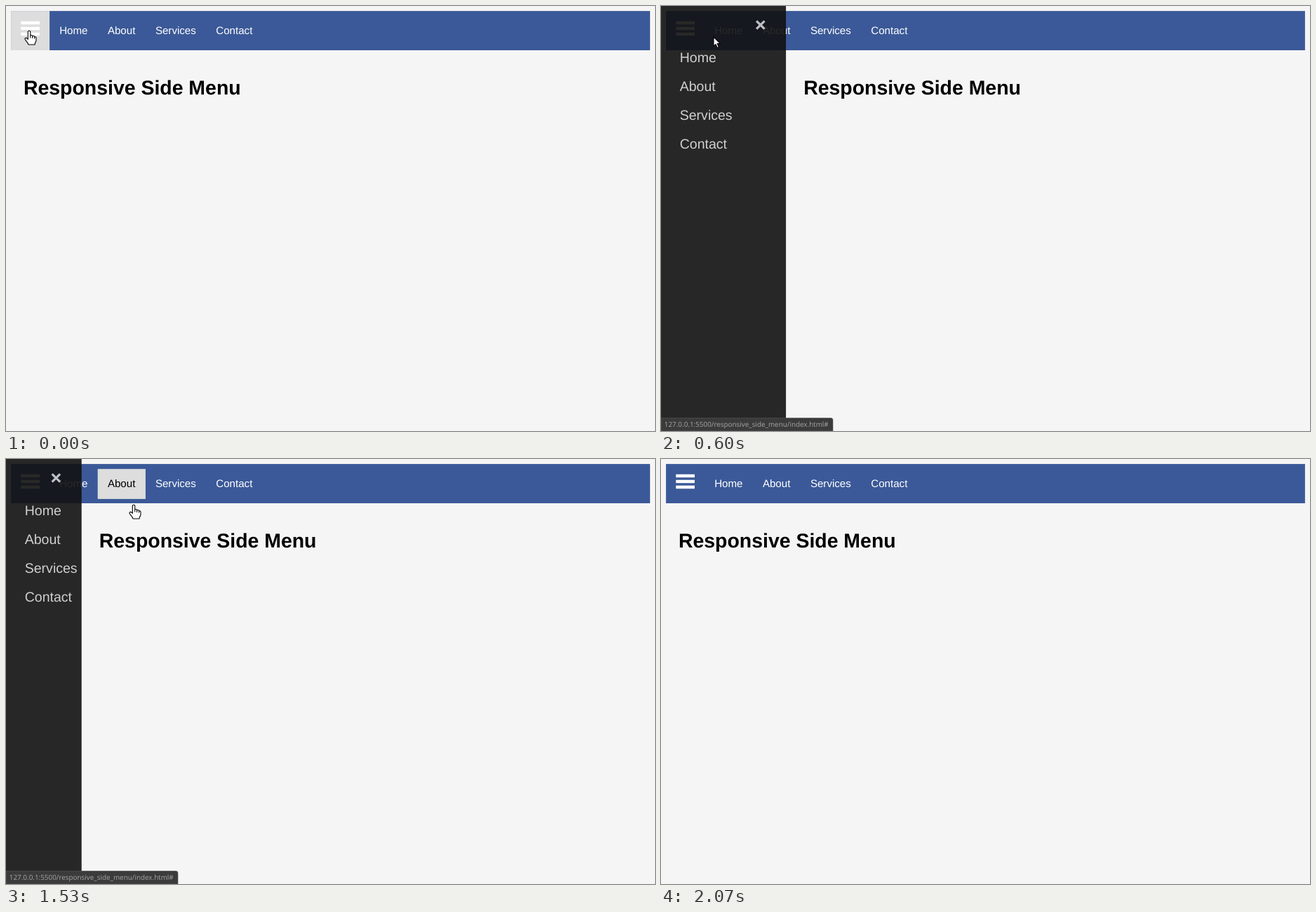
Animation, 925 px wide and 605 px high, one loop 2.67 s. Source, as an HTML page:

```html
<!DOCTYPE html>
<html lang="en">
<head>
<meta charset="utf-8">
<title>Responsive Side Menu</title>
<style>
html, body { margin: 0; width: 100%; height: 100%; overflow: hidden; background: #f5f5f5; }
svg { display: block; }
text { font-family: "Liberation Sans", Arial, sans-serif; text-rendering: geometricPrecision; }
#nav { font-size: 15.11px; fill: #fff; }
#title { font-size: 28.44px; font-weight: bold; }
#links { font-size: 19.56px; fill: #ccc; }
#status text { font: 9.9px "Open Sans", "Noto Sans", sans-serif; fill: #a6a6a6; }
#cursor path { fill: #fff; stroke: #000; stroke-width: 1.1; stroke-linejoin: round; }
</style>
</head>
<body>
<svg width="925" height="605">
  <rect x="7.1" y="7.1" width="910.8" height="55.9" fill="#3b5998"/>
  <rect id="menuHover" x="7.1" y="7.1" width="55" height="55.9" fill="#ddd"/>
  <rect id="aboutHover" x="130.7" y="14.2" width="68.2" height="42.7" fill="#ddd"/>
  <path d="M21.3 24H48M21.3 32H48M21.3 40H48" stroke="#fff" stroke-width="4.4"/>
  <g id="nav">
    <text x="76.2" y="40">Home</text>
    <text id="about" x="144.9" y="40">About</text>
    <text x="212.9" y="40">Services</text>
    <text x="299.3" y="40">Contact</text>
  </g>
  <text id="title" y="125.6">Responsive Side Menu</text>

  <svg id="side" height="605" opacity=".9" overflow="hidden">
    <rect width="100%" height="100%" fill="#111"/>
    <g id="links">
      <text x="26.7" y="80">Home</text>
      <text x="26.7" y="120.9">About</text>
      <text x="26.7" y="161.8">Services</text>
      <text x="26.7" y="202.7">Contact</text>
    </g>
    <path id="close" d="M-5.7-5.7L5.7 5.7M-5.7 5.7L5.7-5.7" stroke-width="3.2"/>
  </svg>

  <g id="status">
    <path d="M0 586.5H242Q245 586.5 245 589.5V605H0Z" fill="#3b3b3b" stroke="#555" stroke-width=".6"/>
    <text x="4.8" y="599.4">127.0.0.1:5500/responsive_side_menu/index.html#</text>
  </g>

  <g id="cursor">
    <path id="arrow" d="M0 0V13.2L3 10.4 5.2 15.4 7.4 14.4 5.2 9.6H9.4Z"/>
    <path id="hand" d="M-1.7 2C-1.7-.4 1.7-.4 1.7 2V7C3 6 4.5 6.5 4.6 8C6 7 7.4 7.6 7.5 9C9 8.5 10 9 10 11V14C10 16 8 17 8 20H-1C-1.5 17.5-4 15.5-5.5 13C-7 11-4.5 9.5-3 11L-1.7 12.5ZM1.7 7V10.5M4.6 8V11M7.5 9V11.5"/>
  </g>
</svg>
<script>
const LOOP = 2670, TICK = 200 / 3, OPEN_WIDTH = 222.2;
const $ = id => document.getElementById(id);
const show = (id, on) => $(id).setAttribute("visibility", on ? "visible" : "hidden");

// Keys are [tick, value, ...]; returns the linearly mixed values.
const STATUS = [[0, 0], [3, 1], [11, 1], [12, .7], [14, 0], [16, 0], [19, 1], [29, 1], [31, 0]];
const POINTER = [[0, 33, 35], [6, 33, 35], [9, 75, 44], [12, 141, 45], [14, 165, 38],
  [17, 182, 26], [22, 182, 26], [23, 182, 65], [24, 182, 190], [26, 180, 620]];
function mix(keys, tick) {
  const next = keys.findIndex(k => k[0] > tick);
  if (next < 0) return keys[keys.length - 1].slice(1);
  const a = keys[next - 1], b = keys[next];
  const p = (tick - a[0]) / (b[0] - a[0]);
  return a.slice(1).map((v, i) => v + (b[i + 1] - v) * p);
}

// CSS "ease": cubic-bezier(.25, .1, .25, 1)
function ease(p) {
  if (p <= 0) return 0;
  if (p >= 1) return 1;
  const curve = (s, a, b) => 3 * (1 - s) ** 2 * s * a + 3 * (1 - s) * s * s * b + s ** 3;
  let lo = 0, hi = 1;
  for (let i = 0; i < 30; i++) {
    const mid = (lo + hi) / 2;
    if (curve(mid, .25, .25) < p) lo = mid; else hi = mid;
  }
  return curve(lo, .1, 1);
}

function tickAt(ms) {
  const tick = Math.floor((ms + 4) / TICK);
  return Math.round(tick * TICK / 10) * 10 > ms ? tick - 1 : tick;
}

function draw(ms) {
  const tick = tickAt(ms), time = tick * TICK;
  const open = tick < 22 ? ease((time - 350) / 500) : 1 - ease((time - 1383) / 500);
  const width = open * OPEN_WIDTH;
  $("side").setAttribute("width", width);
  show("side", width > 0);
  $("title").setAttribute("x", 24.9 + width);
  $("close").setAttribute("transform", `translate(${width - 36.5} 27)`);
  $("close").setAttribute("stroke", tick >= 16 && tick < 22 ? "#fff" : "#ccc");

  const overAbout = tick === 22 || tick === 23;
  show("menuHover", tick < 7);
  show("aboutHover", overAbout);
  $("about").setAttribute("fill", overAbout ? "#000" : "#fff");
  $("status").setAttribute("opacity", mix(STATUS, tick)[0]);

  const isHand = tick < 7 || tick >= 16;
  $("cursor").setAttribute("transform", `translate(${mix(POINTER, tick).join(" ")})`);
  show("hand", isHand);
  show("arrow", !isHand);
}

const start = performance.now();
function run() {
  draw((performance.now() - start) % LOOP);
  requestAnimationFrame(run);
}
run();
</script>
</body>
</html>
```
